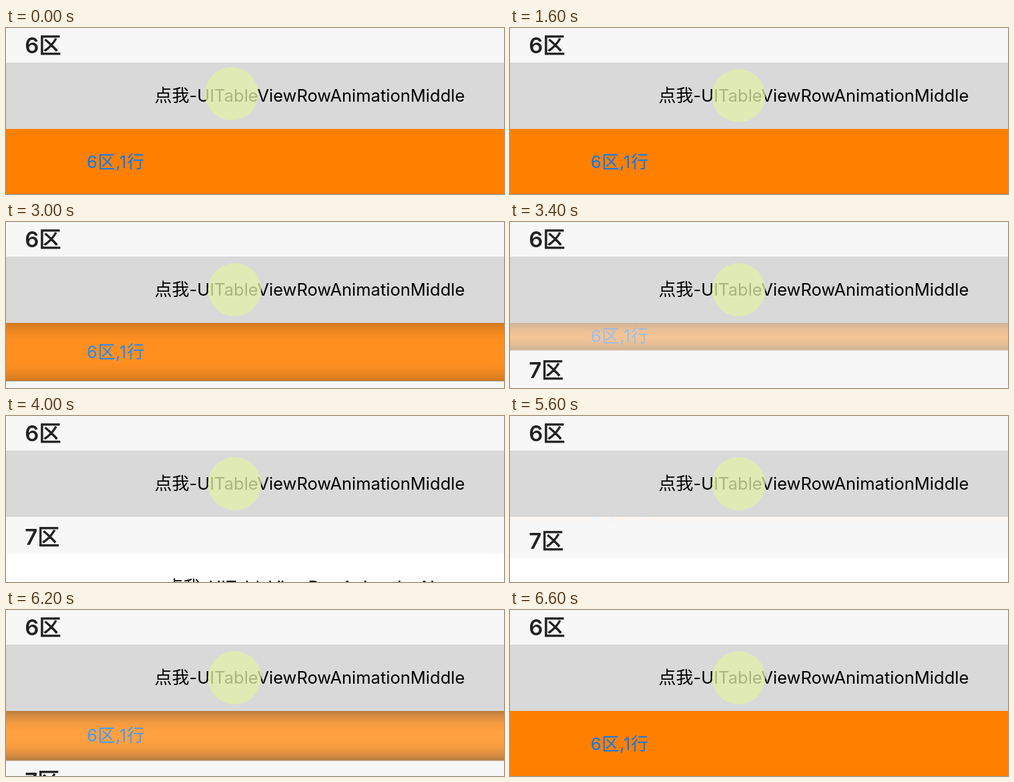
Write an HTML page that moves like this. It is 746 px wide and 250 px high and loops after 8000 ms.

```html
<!DOCTYPE html>
<html lang="zh-CN">
<head>
<meta charset="utf-8">
<style>
html, body { margin: 0; width: 100%; height: 100%; overflow: hidden; background: #fff; }
svg { display: block; }
text { font-family: Inter, "Noto Sans CJK SC", "Noto Sans CJK", sans-serif; font-size: 25.5px; }
.han { font-size: 26px; }
.title { font-size: 33px; font-weight: 600; fill: #222; }
.title .han { font-weight: 400; stroke: #222; stroke-width: .9px; }
.title .han { font-size: 33px; }
#detail { letter-spacing: .7px; }
</style>
</head>
<body>
<svg id="stage" width="746" height="250" viewBox="0 0 746 250"></svg>
<script>
const LOOP = 8000, STEP = 200, TOP = 152, ROW = 100, SHADE = 32;
const CLOSE = { at: 2673, len: 1310 }, OPEN = { at: 5396, len: 1240 };
const touchPath = [[338, 99], [338.5, 97], [337, 90], [337, 89.3], [337.8, 89.8], [338, 97], [342.5, 102]];

const label = (str, attrs) =>
  `<text ${attrs}>${str.replace(/[\u4e00-\u9fff]+/g, s => `<tspan class="han">${s}</tspan>`)}</text>`;
const box = (y, h, fill, extra = '') => `<rect y="${y}" width="746" height="${h}" fill="${fill}" ${extra}/>`;
const section = (n, kind, fill) =>
  box(0, 56, '#f7f7f7') + label(n + '区', 'class="title" style="font-size:33px" x="28.3" y="41.5"') +
  box(56, ROW, fill) + label('点我-UITableViewRowAnimation' + kind, 'x="687.3" y="115" text-anchor="end"');

const falloff = [1, .62, .35, .15, .05, 0]
  .map((o, i) => `<stop offset="${i / 5}" stop-opacity="${o}"/>`).join('');
const $ = id => document.getElementById(id);

$('stage').innerHTML = `
  <defs>
    <linearGradient id="down" x2="0" y2="1">${falloff}</linearGradient>
    <linearGradient id="up" x1="0" y1="1" x2="0" y2="0">${falloff}</linearGradient>
  </defs>
  <g transform="translate(0 -4)">${section(6, 'Middle', '#d9d9d9')}</g>
  <g id="next">${section(7, 'None', '#fff')}</g>
  <svg id="cell" y="${TOP}" width="746" overflow="hidden">
    ${box(0, ROW, '#ff8000')}
    ${label('6区,1行', 'id="detail" x="121" fill="#007aff"')}
    <g id="shade">
      ${box(0, SHADE, 'url(#down)')}
      ${box(0, SHADE, 'url(#up)', 'id="low"')}
    </g>
    ${box(0, 2, '#828286', 'id="edge"')}
  </svg>
  <circle id="touch" r="40" fill="rgb(226,240,170)" fill-opacity=".75"/>`;

// Cubic ease-in-out (.42, 0, .58, 1), solved by bisection
function ease(x) {
  if (x <= 0) return 0;
  if (x >= 1) return 1;
  let lo = 0, hi = 1, s = .5;
  for (let i = 0; i < 24; i++) {
    s = (lo + hi) / 2;
    const px = 3 * (1 - s) * (1 - s) * s * .42 + 3 * (1 - s) * s * s * .58 + s * s * s;
    if (px < x) lo = s; else hi = s;
  }
  return s * s * (3 - 2 * s);
}

const progress = (t, span) => ease((t - span.at) / span.len);

function draw(time) {
  const t = Math.floor(time % LOOP / STEP) * STEP;
  const open = 1 - progress(t, CLOSE) + progress(t, OPEN);
  const h = open * ROW, shown = open > .002;

  const step = Math.max(0, Math.min(touchPath.length - 1, t / STEP - 2));
  const [x, y] = touchPath[step];
  $('touch').setAttribute('cx', x);
  $('touch').setAttribute('cy', y);

  $('next').setAttribute('transform', `translate(0 ${TOP + h + (shown ? 1 : 0)})`);
  $('cell').style.display = shown ? '' : 'none';
  $('cell').setAttribute('height', h + 1);
  $('cell').setAttribute('opacity', open);
  $('detail').setAttribute('y', h / 2 + 9);
  $('shade').setAttribute('opacity', 1.92 * open * (1 - open));
  $('low').setAttribute('y', h - SHADE);
  $('edge').setAttribute('y', h);
}

const start = performance.now();
function tick() {
  draw(performance.now() - start);
  requestAnimationFrame(tick);
}
tick();
</script>
</body>
</html>
```
